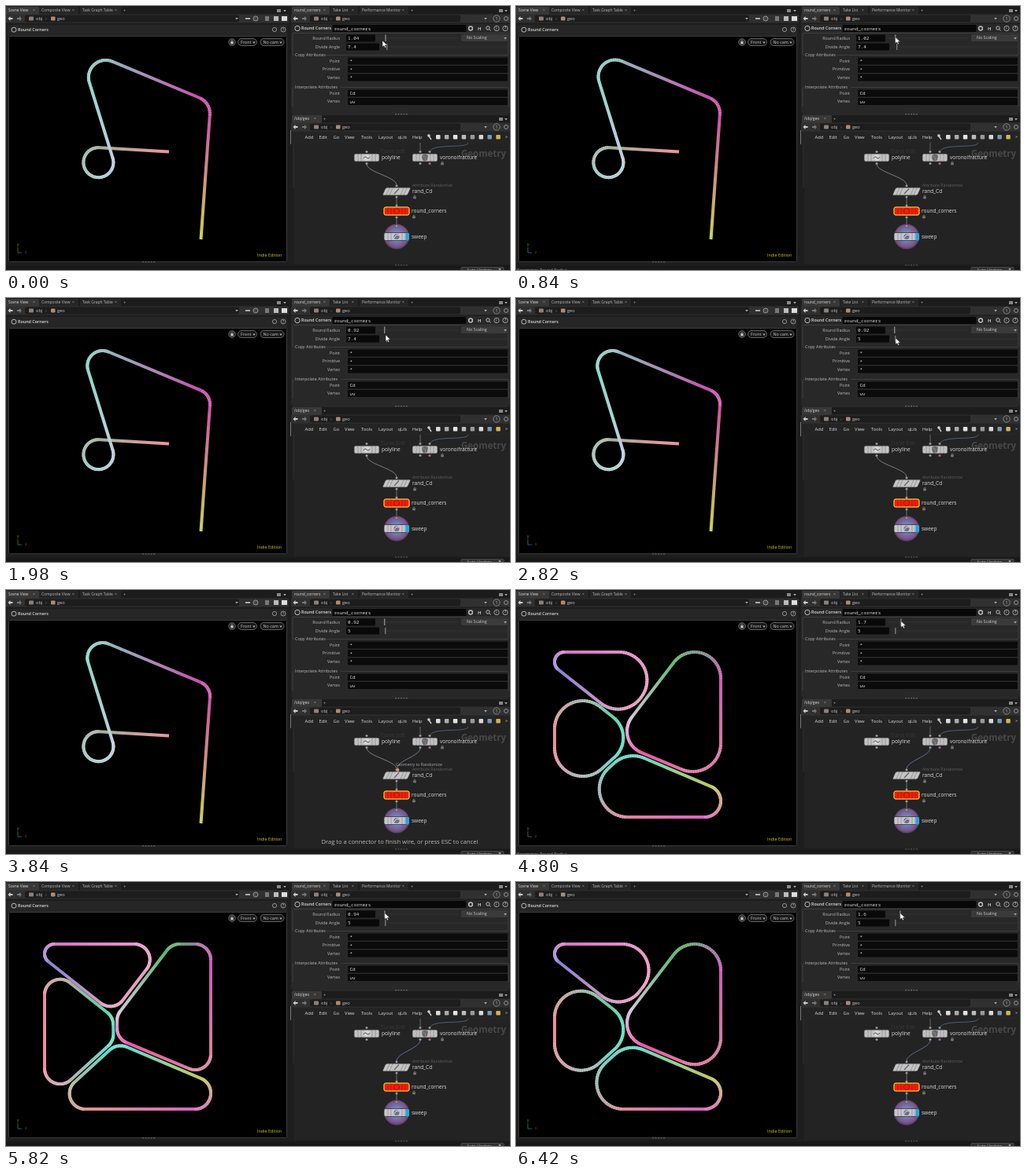
An HTML page with a canvas for the animation above (6660 ms loop, 640 px wide and 336 px high).

```html
<!DOCTYPE html>
<html lang="en">
<head>
<meta charset="utf-8">
<title>Round corners</title>
<style>
  html, body { margin: 0; width: 100%; height: 100%; overflow: hidden; background: #000; }
  canvas { display: block; width: 640px; height: 336px; }
</style>
</head>
<body>
<canvas id="stage" width="640" height="336"></canvas>
<script>
const LOOP = 6660, STEP = 60, PX_PER_UNIT = 21, TUBE = 4;
const SANS = '"Open Sans", sans-serif', MONO = '"Noto Sans Mono", monospace';
const view = document.getElementById('stage').getContext('2d');
const backdrop = document.createElement('canvas');
backdrop.width = 640;
backdrop.height = 336;
let g = backdrop.getContext('2d');

// ---------- drawing helpers ----------
function box(x, y, w, h, fill, radius = 0, stroke) {
  g.beginPath();
  g.roundRect(x, y, w, h, radius);
  if (fill) { g.fillStyle = fill; g.fill(); }
  if (stroke) { g.strokeStyle = stroke; g.lineWidth = 0.8; g.stroke(); }
}
function disc(x, y, r, fill, stroke, width = 0.8) {
  g.beginPath();
  g.arc(x, y, r, 0, Math.PI * 2);
  if (fill) { g.fillStyle = fill; g.fill(); }
  if (stroke) { g.strokeStyle = stroke; g.lineWidth = width; g.stroke(); }
}
function line(points, stroke, width = 0.8) {
  g.beginPath();
  points.forEach(([x, y], i) => i ? g.lineTo(x, y) : g.moveTo(x, y));
  g.strokeStyle = stroke;
  g.lineWidth = width;
  g.stroke();
}
function shape(points, fill) {
  g.beginPath();
  points.forEach(([x, y]) => g.lineTo(x, y));
  g.closePath();
  g.fillStyle = fill;
  g.fill();
}
function text(str, x, y, size = 5.4, fill = '#ccc', { font = SANS, weight = 400, align = 'left' } = {}) {
  g.font = `${weight} ${size}px ${font}`;
  g.textAlign = align;
  g.textBaseline = 'alphabetic';
  g.fillStyle = fill;
  g.fillText(str, x, y + size * 0.35);
}
const mono = (str, x, y) => text(str, x, y, 6, '#ddd', { font: MONO });

// ---------- static interface ----------
function tab(label, x, end, active) {
  box(x - 3, 1, end - x + 3, 10, active ? '#383838' : '#262626', 1);
  text(label, x, 5.5, 4.9, active ? '#ddd' : '#bbb');
  text('×', end - 8, 5.5, 5, '#999');
}
function arrow(x, y, dir) {
  shape([[x - 3 * dir, y], [x, y - 3], [x, y - 1], [x + 3 * dir, y - 1],
    [x + 3 * dir, y + 1], [x, y + 1], [x, y + 3]], dir > 0 ? '#ccc' : '#777');
}
function pathBar(x, y, right) {
  box(x, y - 5.5, right - x, 11, '#303030');
  arrow(x + 5.5, y, 1);
  arrow(x + 17, y, -1);
  box(x + 24, y - 4.5, right - x - 87, 9, '#1d1d1d', 2);
  box(x + 29, y - 2.5, 6, 5, '#8d8078', 1);
  text('obj', x + 38, y, 5.6);
  text('›', x + 50, y, 6, '#888');
  box(x + 57, y - 2.5, 5.5, 5, '#b08a70', 1);
  text('geo', x + 65, y, 5.6);
}
function caret(x, y) {
  shape([[x - 1.8, y - 1], [x + 1.8, y - 1], [x, y + 1.4]], '#aaa');
}
function splitter(x, y) {
  for (let i = -2; i < 3; i++) box(x + i * 3.5, y, 2, 1, '#777');
}

function leftPane() {
  box(0, 0, 360, 11, '#1c1c1c');
  tab('Scene View', 3, 42, true);
  tab('Composite View', 45, 92);
  tab('Task Graph Table', 97, 146);
  text('+', 149, 5.5, 6, '#aaa');
  box(344, 4, 5, 4, '#888');
  caret(354, 6);
  pathBar(0, 16, 359);
  caret(293, 16);
  line([[304, 16], [310, 16]], '#aaa', 2);
  disc(317, 16, 3, '#3f454b', '#aaa');
  box(329, 13, 5, 6, '#777');
  box(340, 13, 6, 6, '#bbb');
  box(350, 13, 7, 6, '#ddd');
  box(2, 24, 355, 14, '#262626');
  disc(10, 30.2, 3, null, '#bbb', 1);
  text('Round Corners', 15, 30.2, 5.4, '#ddd', { weight: 600 });
  disc(341, 30, 2.6, null, '#aaa');
  disc(352, 30, 3, null, '#aaa');
  text('?', 352, 30, 5, '#ccc', { align: 'center' });
  box(3.5, 38.5, 353, 287, '#000', 1, '#444');

  disc(287, 46, 4.2, '#222', '#888');
  box(285.3, 45.5, 3.4, 2.8, '#ccc');
  disc(287, 45, 1.2, null, '#ccc', 0.6);
  box(294.5, 41.5, 24, 9, '#181818', 4.5, '#777');
  text('Front', 298, 46);
  caret(315, 46.5);
  box(323, 41.5, 30, 9, '#181818', 4.5, '#777');
  text('No cam', 326.5, 46);
  caret(349, 46.5);

  line([[15, 314], [15, 307]], '#2c8f3c', 0.8);
  line([[15, 314], [20, 314]], '#2b6fa6', 0.8);
  text('y', 14, 303.5, 5, '#7c9430');
  text('x', 24, 313, 4.5, '#a03c30');
  text('Indie Edition', 319, 317, 5.4, '#d6c81e');
  splitter(180, 325.3);
}

function paramRow(label, value, y) {
  text(label, 424, y, 5.4, '#bbb', { align: 'right' });
  box(434, y - 4.5, 203, 9, '#0b0b0b', 1);
  if (value) mono(value, 436.5, y);
}
function section(label, y, bottom) {
  box(364, y + 0.5, 274, bottom - y, null, 1, '#444');
  box(366, y - 2, label.length * 2.7, 4, '#282828');
  text(label, 367, y, 5.4, '#bbb');
}
function paramPane() {
  box(362, 0, 278, 11, '#1c1c1c');
  tab('round_corners', 366, 411, true);
  tab('Take List', 415, 447);
  tab('Performance Monitor', 452, 511);
  text('+', 514, 5.5, 6, '#aaa');
  box(626, 4, 5, 4, '#888');
  caret(635, 6);
  pathBar(362, 16, 640);
  caret(609, 16);
  disc(623, 16, 4.2, null, '#999');
  text('1', 623, 16, 5, '#ccc', { align: 'center' });
  disc(635, 16, 2.5, null, '#aaa');

  box(362, 23, 278, 113, '#282828');
  disc(370, 28.5, 3.2, null, '#bbb', 1);
  text('Round Corners', 375, 28.5, 5.3, '#ddd', { weight: 600 });
  box(414.5, 24, 170, 9, '#080808', 1);
  mono('round_corners', 416.5, 28.5);
  disc(590, 28.5, 2.4, null, '#bbb', 1.5);
  text('H', 599, 28.5, 6, '#ddd', { weight: 600 });
  disc(612, 28, 2.2, null, '#bbb', 1);
  line([[613.5, 29.5], [615.5, 31.5]], '#bbb', 1);
  for (const [x, c] of [[623, 'i'], [634, '?']]) {
    disc(x, 28.5, 3.2, null, '#bbb');
    text(c, x, 28.5, 5, '#ddd', { align: 'center' });
  }
  text('Round Radius', 424, 41, 5.4, '#bbb', { align: 'right' });
  text('Divide Angle', 424, 52, 5.4, '#bbb', { align: 'right' });
  box(432, 36.5, 37, 9, '#090909', 1);
  box(432, 47.5, 42, 9, '#090909', 1);
  line([[471, 41], [574, 41]], '#363636');
  line([[478, 52], [637, 52]], '#363636');
  box(578, 36, 59, 9, '#3a3a3a', 1);
  text('No Scaling', 585, 40.5, 5.3);
  caret(634, 41);

  section('Copy Attributes', 62, 34);
  paramRow('Point', '*', 70);
  paramRow('Primitive', '*', 80.5);
  paramRow('Vertex', '*', 91);
  section('Interpolate Attributes', 103, 128);
  box(364, 128, 274, 103, '#282828');
  paramRow('Point', 'Cd', 111);
  paramRow('Vertex', 'uv', 121.5);
  splitter(501, 137.2);
}

function networkFrame() {
  box(362, 139, 278, 10, '#1c1c1c');
  box(363, 139, 38, 10, '#383838', 1);
  text('/obj/geo', 366, 143.5, 4.9, '#ddd');
  text('×', 391, 143.5, 5, '#999');
  text('+', 403, 143.5, 6, '#aaa');
  box(626, 142, 5, 4, '#888');
  caret(635, 144);
  pathBar(362, 154, 640);
  caret(609, 154);
  disc(623, 154, 4.2, null, '#999');
  text('1', 623, 154, 5, '#ccc', { align: 'center' });
  disc(635, 154, 2.5, null, '#aaa');
  box(362, 160, 278, 13.5, '#242424');
  const menu = { Add: 379.5, Edit: 397.5, Go: 415.5, View: 430, Tools: 451, Layout: 473, qLib: 497.5, Help: 516 };
  for (const name in menu) text(name, menu[name], 167, 5.8, '#ddd');
  line([[536, 164], [540, 170]], '#ccc', 1.4);
  disc(537, 165, 1.8, '#ccc');
  ['#ddd', '#aaa', '#e5e5e5', '#bbb', '#999', '#d8d8d8', '#7899b5', '#d0b450']
    .forEach((c, i) => box(546 + i * 10.9, 164, 5.5, 5.5, c, 1));
  text('»', 634, 166, 6, '#ccc');
  box(366, 174, 274, 155, '#232323');
  text('Geometry', 578, 188, 11.5, '#484848', { weight: 700 });
  text('Curve Edit', 476, 185, 6.5, '#393939');
  line([[526, 174], [526, 186]], '#777');
  g.beginPath();
  g.moveTo(587, 174);
  g.bezierCurveTo(586, 182, 540, 174, 538, 186);
  g.strokeStyle = '#5c6d91';
  g.stroke();
  splitter(501, 329.5);
  box(361, 158, 1, 18, '#777');
}

function node(x, y, fill, slant = 0, edge = '#333') {
  g.save();
  g.translate(x, y);
  g.transform(1, 0, -slant, 1, 0, 0);
  box(-16, -5, 32, 10, fill, 2, edge);
  for (const dx of [-11, -7, 7, 11]) line([[dx, -5], [dx, 5]], 'rgba(0,0,0,.3)', 0.7);
  g.restore();
}
function lock(x, y) {
  box(x - 1.8, y - 0.5, 3.6, 2.8, '#777');
  disc(x, y - 0.7, 1.2, null, '#777', 0.7);
}
function port(x, y, fill = '#aaa') { disc(x, y, 1.5, fill, '#444', 0.5); }

function nodes() {
  line([[496, 242], [496, 256]], '#888');
  line([[496, 267], [496, 280]], '#888');
  [[458, 185.5], [458, 200.5], [526, 185.5], [538, 185.5], [526, 200.5], [496, 229], [496, 243],
    [496, 254], [496, 269]].forEach(p => port(...p));
  port(538, 200.5, '#c66aa8');
  node(458, 193, '#c2c2c2');
  disc(458, 193, 4, '#d4d4d4');
  g.beginPath();
  g.moveTo(454, 194);
  g.bezierCurveTo(457, 188, 459, 198, 462, 192);
  g.strokeStyle = '#444';
  g.lineWidth = 0.9;
  g.stroke();
  node(532, 193, '#c2c2c2');
  shape([[528, 190], [532, 188.5], [536, 190], [535, 196], [531, 198], [528.5, 195]], '#666');
  line([[529, 191], [533, 193], [532, 197]], '#999', 0.7);
  node(496, 236, '#c4c4c4', 0.45);
  line([[493, 239], [499, 232.5]], '#666', 1.3);
  node(496, 261, '#f01e0c', 0, '#f0c52c');
  box(480, 256, 32, 10, null, 2, '#f5cd39');
  disc(496, 261, 3.6, null, '#a81408', 1);

  const halo = g.createRadialGradient(496, 293, 2, 496, 293, 16);
  halo.addColorStop(0, '#8796bd');
  halo.addColorStop(0.65, '#6c669f');
  halo.addColorStop(0.8, '#865389');
  halo.addColorStop(1, '#59426a');
  disc(496, 293.5, 16, halo);
  node(496, 293.5, '#c6c6cf');
  box(507.5, 289, 4, 9.5, '#1ba9e6', 1);
  disc(496, 293.5, 3.5, '#707088');
  line([[493, 295], [496, 291], [499, 292]], '#ddd', 1);
  port(496, 280);

  text('polyline', 477, 193, 6.5, '#ddd');
  text('voronoifracture', 551, 193, 6.5, '#ddd');
  text('Attribute Randomize', 516, 228, 5.3, '#606060');
  text('rand_Cd', 516, 236, 6.5, '#ddd');
  text('round_corners', 515, 261, 6.5, '#ddd');
  text('sweep', 515, 294, 6.5, '#ddd');
  [[554, 200], [519, 243], [518, 268]].forEach(p => lock(...p));
}

function statusBar() {
  box(0, 330.5, 640, 5.5, '#191919');
  box(578, 332.5, 54, 6, '#303030', 1, '#555');
  text('Auto Update', 585, 336.3, 5.4, '#bbb');
  caret(627, 335);
}

// ---------- geometry ----------
const pt = (x, y, hex) => ({ x, y, c: [1, 3, 5].map(i => parseInt(hex.substr(i, 2), 16)) });
const openCurve = [
  pt(207, 185.5, '#f0929c'), pt(62.5, 176.8, '#6fc49c'), pt(155.2, 257, '#dcc8ec'),
  pt(92, 52.6, '#7ddcbe'), pt(260, 122.8, '#cf46ae'), pt(247.5, 297, '#c8d25a')
];
const cells = [
  [pt(49, 79, '#d273c3'), pt(203, 79, '#eb9fc8'), pt(136, 166.5, '#e6a0bc'), pt(49, 97.5, '#8480d8')],
  [pt(210.5, 79, '#4bb95f'), pt(260, 79, '#c850be'), pt(260, 249, '#d78c96'), pt(141, 199.3, '#f04eaa'), pt(141, 169.8, '#d7c8e1')],
  [pt(49, 102.5, '#e1919a'), pt(136, 172, '#50dcaa'), pt(136.5, 202.5, '#5fe1cd'), pt(49, 282, '#f08ea0')],
  [pt(141.4, 205, '#55dcd7'), pt(260, 255.3, '#cdc850'), pt(260, 289, '#d75fc8'), pt(49.5, 289, '#e1a578')]
];
const mix = (a, b, k) => a + (b - a) * k;
const mixColor = (a, b, k) => a.map((v, i) => mix(v, b[i], k));
const rgb = c => `rgb(${c.map(Math.round)})`;
const dist = (a, b) => Math.hypot(b.x - a.x, b.y - a.y);
const along = (a, b, k) => ({ x: mix(a.x, b.x, k), y: mix(a.y, b.y, k), c: mixColor(a.c, b.c, k) });

function segment(a, b, cap) {
  const grad = g.createLinearGradient(a.x, a.y, b.x, b.y);
  grad.addColorStop(0, rgb(a.c));
  grad.addColorStop(1, rgb(b.c));
  g.lineCap = cap;
  line([[a.x, a.y], [b.x, b.y]], grad, TUBE);
  g.lineCap = 'butt';
}

// Fillets share an edge when their tangent lengths would overlap.
function roundCorners(pts, closed, radius, divide) {
  const n = pts.length, at = i => pts[(i + n) % n];
  const corners = pts.map((p, i) => {
    const a = at(i - 1), b = at(i + 1);
    const u = Math.atan2(a.y - p.y, a.x - p.x), v = Math.atan2(b.y - p.y, b.x - p.x);
    const half = Math.acos(Math.cos(u - v)) / 2;
    const end = !closed && (i === 0 || i === n - 1);
    return { p, a, b, u, v, half, end, k: end ? 0 : 1 / Math.tan(half) };
  });
  corners.forEach((c, i) => {
    const prev = corners[(i + n - 1) % n], next = corners[(i + 1) % n];
    c.r = c.end ? 0 : Math.min(radius, dist(c.p, c.a) / (c.k + prev.k), dist(c.p, c.b) / (c.k + next.k));
    c.t = c.r * c.k;
    c.from = c.end ? c.p : along(c.p, c.a, c.t / dist(c.p, c.a));
    c.to = c.end ? c.p : along(c.p, c.b, c.t / dist(c.p, c.b));
  });
  const ticks = [];
  corners.forEach((c, i) => {
    if (closed || i < n - 1) segment(c.to, corners[(i + 1) % n].from, 'butt');
    if (c.end) return;
    const reach = c.r / Math.sin(c.half);
    const mx = Math.cos(c.u) + Math.cos(c.v), my = Math.sin(c.u) + Math.sin(c.v), m = Math.hypot(mx, my);
    const cx = c.p.x + mx / m * reach, cy = c.p.y + my / m * reach;
    const start = Math.atan2(c.from.y - cy, c.from.x - cx);
    let sweep = Math.atan2(c.to.y - cy, c.to.x - cx) - start;
    sweep = Math.atan2(Math.sin(sweep), Math.cos(sweep));
    const count = Math.max(1, Math.ceil(Math.abs(sweep) * 180 / Math.PI / divide));
    let last = c.from;
    for (let s = 1; s <= count; s++) {
      const ang = start + sweep * s / count;
      const q = { x: cx + c.r * Math.cos(ang), y: cy + c.r * Math.sin(ang), c: mixColor(c.from.c, c.to.c, s / count) };
      segment(last, q, 'round');
      ticks.push([q, Math.cos(ang) * TUBE / 2, Math.sin(ang) * TUBE / 2]);
      last = q;
    }
  });
  if (radius > 5) for (const [q, dx, dy] of ticks)
    line([[q.x - dx, q.y - dy], [q.x + dx, q.y + dy]], 'rgba(255,255,255,.3)', 0.8);
}

// ---------- motion ----------
const radiusKeys = [[0, 1.04], [720, 1.04], [780, 1.02], [900, 1.01], [1180, 0.06], [1470, 0.87], [1620, 0.92],
  [4500, 0.92], [4800, 1.7], [4920, 1.78], [5340, 0.58], [5580, 0.2], [5940, 1.2], [6180, 1.6]];
const divideKeys = [[0, 7.4], [2220, 7.4], [2490, 40], [2820, 5]];
const pointerX = [[0, 478], [780, 482], [1620, 481], [1980, 482], [2220, 483], [2490, 512], [2820, 482],
  [3060, 492], [3420, 527], [3540, 526], [3780, 497], [3960, 497], [4380, 481]];
const pointerY = [[0, 44], [780, 39.5], [1620, 40], [1980, 47], [2220, 51], [2820, 51], [3060, 85], [3420, 199],
  [3540, 201], [3780, 227], [3960, 227], [4380, 39.5]];

function valueAt(keys, t) {
  let i = keys.findIndex(k => k[0] > t);
  if (i < 0) return keys[keys.length - 1][1];
  const [t0, a] = keys[i - 1], [t1, b] = keys[i];
  const k = (t - t0) / (t1 - t0);
  return mix(a, b, k * k * (3 - 2 * k));
}
const trim = (v, digits) => String(+v.toFixed(digits));

function wire(x0, y0, x1, y1, color) {
  const pull = (y1 - y0) * 0.4;
  g.beginPath();
  g.moveTo(x0, y0);
  g.bezierCurveTo(x0, y0 + pull, x1, y1 - pull, x1, y1);
  g.strokeStyle = color;
  g.lineWidth = 0.9;
  g.stroke();
}
function pointer(x, y) {
  g.beginPath();
  [[0, 0], [0, 8], [2, 6.4], [3.4, 9.2], [4.7, 8.6], [3.4, 5.9], [6, 5.7]].forEach(([dx, dy]) => g.lineTo(x + dx, y + dy));
  g.closePath();
  g.fillStyle = '#fff';
  g.fill();
  g.strokeStyle = '#222';
  g.lineWidth = 0.5;
  g.stroke();
}

function draw(t) {
  g = view;
  g.drawImage(backdrop, 0, 0);
  const radius = valueAt(radiusKeys, t), divide = valueAt(divideKeys, t);
  const joined = t >= 3960, dragging = t >= 3540 && !joined;
  const snapping = dragging && t >= 3720;
  const knob = 471 + radius * 10.5;
  const sliding = (t >= 780 && t < 1620) || t >= 4440;
  const px = sliding ? knob : valueAt(pointerX, t), py = valueAt(pointerY, t);

  if (joined) cells.forEach(c => roundCorners(c, true, radius * PX_PER_UNIT, divide));
  else roundCorners(openCurve, false, radius * PX_PER_UNIT, divide);

  mono(trim(radius, 2), 434, 41);
  mono(trim(divide, 1), 434, 52);
  box(knob - 0.5, 36.5, 1.2, 8.5, '#999');
  box(477.2 + divide * 0.8, 48, 1.2, 8, '#888');

  if (joined) wire(526, 201, 496, 228, '#66769e');
  else wire(458, 201, 496, 228, '#85868e');
  if (dragging) {
    wire(526, 201, px, py, '#7a8496');
    text('Drag to a connector to finish wire, or press ESC to cancel', 400.5, 320, 7.6, '#bbb');
  }
  if (snapping) {
    text('Geometry to Randomize', 495, 222, 5.2, '#aaa');
    disc(497.5, 229, 1.9, '#ea8c84');
  } else pointer(px, py);
  if (sliding && t < 5220) text('Parameter: Round Radius', 1, 336.3, 5.4, '#aaa');
}

box(0, 0, 640, 336, '#1e1e1e');
leftPane();
paramPane();
networkFrame();
nodes();
statusBar();

const began = performance.now();
function tick() {
  const t = (performance.now() - began) % LOOP;
  draw(Math.floor(t / STEP) * STEP);
  requestAnimationFrame(tick);
}
tick();
</script>
</body>
</html>
```
